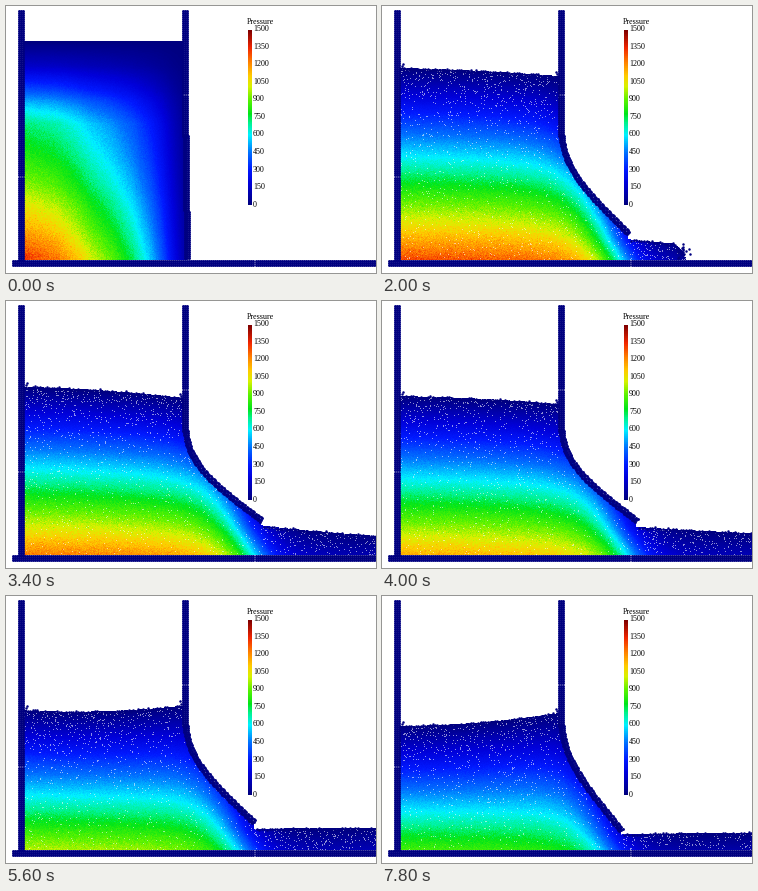
A matplotlib script for the animation above (8 s loop, 370 px wide and 267 px high).

```python
import numpy as np
import matplotlib.pyplot as plt
from matplotlib.animation import FuncAnimation
from matplotlib.colors import LinearSegmentedColormap

W, H, DPI = 370, 267, 100
FRAMES, STEP = 40, 200
PX = 72 / DPI
NAVY = (0, 0, 0.5)
FLOOR, LEFT, RIGHT, HINGE = 254, 18, 177, 130

# Key times (ms) and the quantities that are interpolated between them
TIMES = np.array([0, 1200, 2000, 3400, 4800, 6400, 7800])
KEYS = {
    "left": [35, 47, 62, 86, 106, 121, 130],
    "mid": [35, 49, 65, 89.5, 107, 121.5, 126.5],
    "right": [35, 51, 70, 97, 108, 110.5, 117],
    "tip_x": [181, 222, 246, 255, 251, 244, 239],
    "tip_y": [252, 243, 227, 219, 222, 230, 234],
    "out_near": [253, 247, 233, 224, 230, 235, 238],
    "out_far": [253, 247, 243, 235, 230, 235, 237],
    "base_p": [1000, 1030, 1300, 1230, 1050, 940, 870],
}

PRESSURE = LinearSegmentedColormap.from_list("pressure", [
    (0, NAVY), (0.12, (0, 0, 0.85)), (0.2, (0, 0.1, 1)), (0.3, (0, 0.45, 1)),
    (0.4, (0, 0.95, 1)), (0.47, (0, 0.95, 0.55)), (0.52, (0, 0.9, 0.1)),
    (0.6, (0.35, 0.95, 0)), (0.68, (0.85, 0.95, 0)), (0.74, (1, 0.8, 0)),
    (0.82, (1, 0.5, 0)), (0.9, (0.95, 0.15, 0)), (1, (0.5, 0, 0))])

X, Y = np.meshgrid(np.arange(W) + 0.5, np.arange(H) + 0.5)


def key(name, t):
    """Cubic Hermite interpolation through the key values."""
    v = np.array(KEYS[name], float)
    m = np.gradient(v, TIMES)
    m[0] = 0
    k = min(np.searchsorted(TIMES, t, side="right") - 1, len(TIMES) - 2)
    h = TIMES[k + 1] - TIMES[k]
    s = (t - TIMES[k]) / h
    return ((2 * s**3 - 3 * s**2 + 1) * v[k] + (s**3 - 2 * s**2 + s) * h * m[k]
            + (3 * s**2 - 2 * s**3) * v[k + 1] + (s**3 - s**2) * h * m[k + 1])


def surface(x, t):
    """Free surface in the tank, a parabola through three heights."""
    u = np.clip((x - LEFT) / (RIGHT - LEFT), 0, 1)
    a, b, c = key("left", t), key("mid", t), key("right", t)
    return a + (4 * b - 3 * a - c) * u + 2 * (a + c - 2 * b) * u**2


def gate_curve(t, n=62):
    """Centre line of the bending gate, clamped at its upper end."""
    dx, dy = key("tip_x", t) - 180, key("tip_y", t) - HINGE
    s = np.linspace(0, 1, n)
    angle = 4 / 3 * np.arctan2(dx, dy) * (1 - (1 - s)**3)
    x, y = np.cumsum(np.sin(angle)), np.cumsum(np.cos(angle))
    x, y = x - x[0], y - y[0]
    return 180 + x * dx / max(x[-1], 1e-6), HINGE + y * dy / y[-1]


def front(t):
    return np.interp(t, [0, 1200, 2000, 2600], [180, 228, 304, 385])


def outflow(x, t):
    """Surface of the stream beyond the gate, blunt at its front."""
    tip = key("tip_x", t)
    u = np.clip((x - tip) / (W - tip), 0, 1)
    a, b = key("out_near", t), key("out_far", t)
    y = a + (b - a) * u**0.8
    return FLOOR - (FLOOR - y) * np.sqrt(np.clip((front(t) - x) / 12, 0, 1))


def initial_pressure():
    column = np.interp(Y, [35, 60, 75, 85, 95, 105, 118, 150, 180, 195, 220, 253],
                       [0, 150, 300, 400, 520, 610, 720, 830, 950, 1030, 1150, 1330])
    across = np.interp((X - LEFT) / (RIGHT - LEFT),
                       [0, 0.2, 0.33, 0.42, 0.55, 0.68, 0.8, 0.87, 0.93, 1],
                       [1, 0.94, 0.85, 0.77, 0.68, 0.56, 0.41, 0.3, 0.19, 0.08])
    return column * across


START = initial_pressure()


def fluid(t, rng):
    """RGBA picture of the water coloured by pressure."""
    gx, gy = gate_curve(t)
    top, out = surface(X, t), outflow(X, t)
    bound = np.where(Y < HINGE, RIGHT, np.interp(Y, gy, gx))
    inside = (X < bound) & (Y > top)
    mask = (inside | ((X >= bound) & (Y > gy[-1]) & (Y > out))) & (X > LEFT) & (Y < FLOOR)

    drop = np.interp(t, [0, 1200, 2000], [0.25, 0.2, 0.05])
    tank = key("base_p", t) * (Y - top) / (FLOOR - top)
    tank = tank * (1 - drop * np.clip((X - LEFT) / 160, 0, 1.2)**2)
    edge = gx[-1] - 10 - 0.3 * (FLOOR - Y)
    share = 1 / (1 + np.exp(np.clip((X - edge) / 15, -40, 40)))
    p = share * tank + (1 - share) * 5 * np.clip(Y - out, 0, None)
    blend = np.clip(t / 900, 0, 1)
    blend = blend * blend * (3 - 2 * blend)
    p = START + (p - START) * blend

    p = p * (1 + 0.02 * rng.standard_normal(p.shape))
    burst = 250 * np.exp(-((t - 1200) / 400)**2)
    p += burst * rng.standard_normal(p.shape) * np.exp(
        -((X - 186) / 14)**2 - ((Y - 243) / 7)**2)

    rgba = PRESSURE(np.clip(p / 1500, 0, 1))
    depth = np.where(inside, Y - top, Y - out)
    chance = (0.02 + 0.08 * np.exp(-np.clip(depth, 0, None) / 25)) * min(t / 1500, 1)
    gaps = rng.random(p.shape) < chance
    rgba[gaps, :3] += (1 - rgba[gaps, :3]) * 0.55
    rgba[..., 3] = mask
    return rgba


def thicken(x, y):
    """Three rows of beads along a path."""
    nx, ny = -np.gradient(y), np.gradient(x)
    size = np.hypot(nx, ny)
    nx, ny = nx / size, ny / size
    return (np.concatenate([x + d * nx for d in (-2, 0, 2)]),
            np.concatenate([y + d * ny for d in (-2, 0, 2)]))


def crest(t, rng):
    """Loose beads on both water surfaces, at the walls and at the front."""
    x = np.arange(LEFT + 1.5, RIGHT - 1, 2.4)
    y = surface(x, t) + 0.5
    moving = min(t / 1200, 1)
    y = y + 0.7 * moving * rng.standard_normal(len(x))
    parts = [(x, y)]
    if t > 0:
        rise = np.array([2, 4.5]) * moving
        parts += [(np.array([19.5, 20.5]), key("left", t) - rise),
                  (np.array([175, 174]), key("right", t) - rise)]
    f, tip = front(t), key("tip_x", t)
    if f > tip + 3:
        xo = np.arange(tip + 3, min(f - 3, W), 2.6)
        parts.append((xo, outflow(xo, t) + 0.6 * rng.standard_normal(len(xo)) + 0.5))
    if t >= 800 and f < W + 10:
        a = rng.uniform(-9, 4, 16)
        high = outflow(f - 12, t)
        parts.append((f + a, rng.uniform(high - 1, FLOOR - 2, 16)))
    return [np.concatenate(c) for c in zip(*parts)]


fig = plt.figure(figsize=(W / DPI, H / DPI), dpi=DPI, facecolor="white")
ax = fig.add_axes([0, 0, 1, 1])
ax.set_xlim(0, W)
ax.set_ylim(H, 0)
ax.axis("off")


def beads(size, z):
    return ax.plot([], [], "o", color=NAVY, ms=size * PX, mew=0, zorder=z)[0]


water = ax.imshow(np.zeros((H, W, 4)), extent=(0, W, H, 0), aspect="auto",
                  interpolation="nearest", zorder=1)
drops = beads(2.5, 2)
gate = beads(2.9, 4)

walls = [((15, 15), (4.5, FLOOR)), ((178.5, 178.5), (4.5, HINGE)), ((6.5, W), (257, 257))]
for (x0, x1), (y0, y1) in walls:
    n = int(max(x1 - x0, y1 - y0) / 2) + 1
    beads(2.9, 3).set_data(*thicken(np.linspace(x0, x1, n), np.linspace(y0, y1, n)))

# Colour scale
ax.imshow(np.linspace(1, 0, 256)[:, None], cmap=PRESSURE, extent=(242, 246, 199, 24),
          aspect="auto", zorder=5)
ax.set_xlim(0, W)
ax.set_ylim(H, 0)
font = dict(family="Liberation Serif", fontsize=8 * PX, color="black", va="baseline")
ax.text(240.5, 18, "Pressure", **font)
for i in range(11):
    ax.text(247, 25.2 + 17.55 * i, str(1500 - 150 * i), **font)


def draw(i):
    t = i * STEP
    rng = np.random.default_rng(100 + i)
    water.set_data(fluid(t, rng))
    drops.set_data(*crest(t, rng))
    gate.set_data(*thicken(*gate_curve(t)))
    return water, drops, gate


anim = FuncAnimation(fig, draw, frames=FRAMES, interval=STEP, repeat=True)
plt.show()
```
